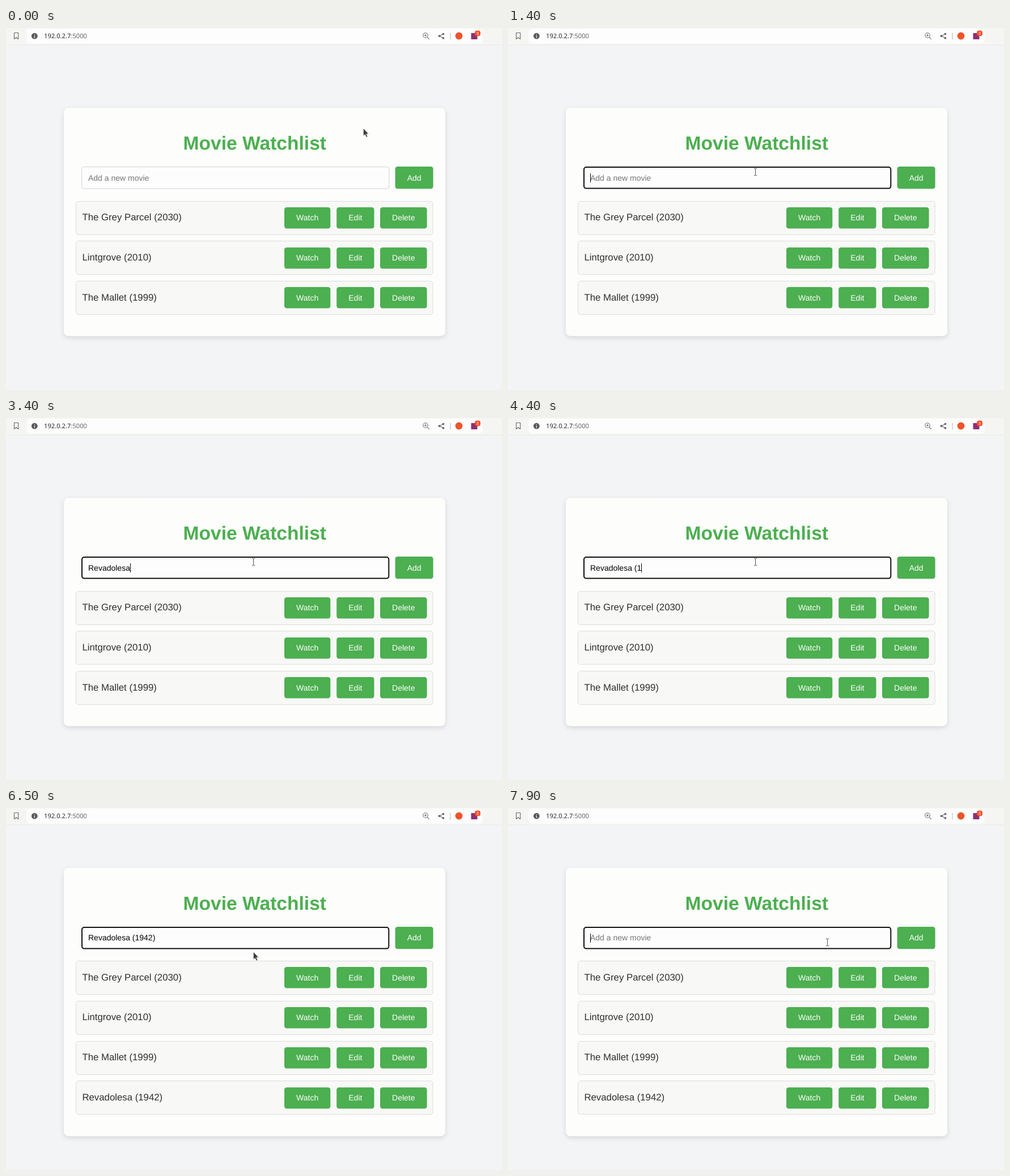
An HTML page for the animation above (8000 ms loop, 875 by 640 pixels).

```html
<!DOCTYPE html>
<html lang="en">
<head>
<meta charset="utf-8">
<title>Movie Watchlist</title>
<style>
  html, body { margin: 0; width: 100%; height: 100%; overflow: hidden; background: #f3f4f6; }
  svg { display: block; width: 875px; height: 640px; font-family: "Liberation Sans", Arial, sans-serif; }
  text { white-space: pre; text-rendering: geometricPrecision; }
  .icon { fill: none; stroke: #686868; stroke-width: 1.1; }
  .url { font: 11.2px "Noto Sans", "Open Sans", sans-serif; fill: #2b2b2b; }
  .title { font-size: 33.6px; font-weight: bold; fill: #4caf50; text-anchor: middle; }
  .name { font-size: 16.8px; fill: #2f2f2f; }
  .label { font-size: 14px; fill: #fff; text-anchor: middle; }
  .field { font-size: 14px; }
  .card { fill: #fdfdfc; filter: drop-shadow(0 3px 4px rgba(0, 0, 0, .12)); }
</style>
</head>
<body>
<svg viewBox="0 0 875 640">
  <rect width="875" height="640" fill="#f3f4f6"/>

  <g id="toolbar">
    <rect width="875" height="30" fill="#f5f6f3"/>
    <path d="M0 30H875" stroke="#e9eae4"/>
    <rect x="36.5" y="1" width="804" height="26.5" rx="6" fill="#fdfdfd"/>
    <path class="icon" d="M14.5 8.5h7.2v11l-3.6-2.8-3.6 2.8z" stroke-linejoin="round"/>
    <circle cx="50.3" cy="14.2" r="5.4" fill="#58595b"/>
    <path d="M50.3 11v1.3M50.3 13.4v4" stroke="#fff" stroke-width="1.2"/>
    <text class="url" x="67" y="18">192.0.2.7<tspan fill="#666">:5000</tspan></text>
    <g class="icon">
      <circle cx="740" cy="13" r="4.2"/>
      <path d="M743.1 16.2l3.6 3.6M738 13h4M740 11v4"/>
      <path d="M771.2 10.8l-6.4 3.3 6.4 3.3"/>
    </g>
    <g fill="#686868">
      <circle cx="771.4" cy="10.6" r="1.9"/>
      <circle cx="764.4" cy="14.2" r="1.9"/>
      <circle cx="771.4" cy="17.8" r="1.9"/>
    </g>
    <path d="M784 8.5v12" stroke="#b5b5b5"/>
    <circle cx="799" cy="14" r="6.4" fill="#f0532a"/>
    <rect x="820.5" y="9" width="11" height="11" fill="#8f2f72"/>
    <rect x="827" y="4.6" width="10" height="9.6" rx="4" fill="#f4512c"/>
    <text x="832" y="11.8" font-size="7" fill="#fff" text-anchor="middle">3</text>
  </g>

  <g id="page"></g>
  <rect id="input" rx="4" fill="#fdfdfd"/>
  <text id="field" class="field" x="145"></text>
  <path id="caret" d="M.5 0v16" stroke="#000"/>
  <g id="pointer">
    <path id="arrow" d="M0 0v13.2l2.9-2.5 2.3 4.8 2.2-1-2.3-4.7h4z" fill="#3a3b3d" stroke="#f4f4f4" stroke-width=".6"/>
    <path id="beam" d="M-2.7-6.2h2L0-5.5.7-6.2h2M-2.7 6.2h2L0 5.5.7 6.2h2M0-5.5v11" fill="none" stroke="#505050"/>
  </g>
</svg>
<script>
  const LOOP = 8000, STEP = 100, BLINK = 500;
  const ROW = 70.7, FIRST_ROW = 305.7;
  const FOCUS = 1100, SUBMIT = 6300, CLEAR = 7700;
  const ENTRY = "Revadolesa (1942)";
  const MOVIES = ["The Grey Parcel (2030)", "Lintgrove (2010)", "The Mallet (1999)", ENTRY];
  const KEY_TIMES = [1900, 2000, 2200, 2300, 2500, 2700, 2900, 3000, 3200, 3300,
                     3700, 4000, 4300, 4700, 5000, 5300, 5600];
  // time, x, y
  const POINTER = [[0, 630, 177], [100, 630, 177], [1000, 436, 254], [6900, 436, 254],
                   [7400, 507, 229], [7900, 563, 237]];

  const $ = id => document.getElementById(id);
  const set = (el, attrs) => { for (const k in attrs) el.setAttribute(k, attrs[k]); };
  const show = (el, on) => set(el, { visibility: on ? "visible" : "hidden" });
  const snap = Math.round;

  const button = (x, y, width, height, baseline, label) =>
    `<rect x="${x}" y="${snap(y)}" width="${width}" height="${height}" rx="4.2" fill="#4caf50"/>
     <text class="label" x="${x + width / 2}" y="${snap(baseline)}">${label}</text>`;

  function row(name, y) {
    const baseline = y + 34.43;
    const action = (x, width, label) => button(x, y + 11.1, width, 37.5, baseline, label);
    return `<rect x="123.5" y="${snap(y) + .5}" width="629.6" height="59" rx="4.2" fill="#f8f8f7" stroke="#dddde0"/>
      <text class="name" x="134.4" y="${snap(baseline)}">${name}</text>
      ${action(491, 81.3, "Watch")}${action(583.2, 66.3, "Edit")}${action(660, 82.6, "Delete")}`;
  }

  // The card is centred, so each extra row lifts its top by half a row.
  function page(count, lift) {
    const rows = MOVIES.slice(0, count).map((name, i) => row(name, FIRST_ROW + i * ROW - lift));
    return `<rect class="card" x="102" y="${141.2 - lift}" width="673" height="${403.6 + 2 * lift}" rx="8.4"/>
      <text class="title" x="438.8" y="${snap(215.3 - lift)}">Movie Watchlist</text>
      ${button(686.6, 245.4 - lift, 67, 39.2, 269.6 - lift, "Add")}${rows.join("")}`;
  }

  function pointerAt(t) {
    const i = POINTER.findIndex(p => p[0] > t);
    if (i < 0) return POINTER[POINTER.length - 1].slice(1);
    const [t0, x0, y0] = POINTER[i - 1], [t1, x1, y1] = POINTER[i];
    const u = (t - t0) / (t1 - t0), e = u * u * (3 - 2 * u);
    return [x0 + (x1 - x0) * e, y0 + (y1 - y0) * e];
  }

  let shownCount = 0;
  function render(t) {
    const focused = t >= FOCUS;
    const count = t >= SUBMIT ? 4 : 3;
    const lift = (count - 3) * ROW / 2;
    if (count !== shownCount) $("page").innerHTML = page(shownCount = count, lift);

    const inputTop = snap(245.3 - lift);
    const inset = focused ? 1 : .5;
    set($("input"), {
      x: 133 + inset, y: inputTop + inset, width: 543.3 - 2 * inset, height: 39.6 - 2 * inset,
      stroke: focused ? "#101010" : "#d2d2d2", "stroke-width": 2 * inset
    });

    const keys = KEY_TIMES.filter(k => k <= t);
    const typed = t < CLEAR ? ENTRY.slice(0, keys.length) : "";
    const field = $("field");
    field.textContent = typed || "Add a new movie";
    set(field, { y: snap(269.6 - lift), fill: typed ? "#000" : "#757575" });

    const lastEdit = t >= CLEAR ? CLEAR : keys.length ? keys[keys.length - 1] : FOCUS;
    const caretX = 145 + (typed ? snap(field.getComputedTextLength()) : 0);
    set($("caret"), { transform: `translate(${caretX} ${inputTop + 12})` });
    show($("caret"), focused && Math.floor((t - lastEdit) / BLINK) % 2 === 0);

    const [x, y] = pointerAt(t);
    const inField = x > 133 && x < 677 && y > inputTop && y < inputTop + 40;
    set($("pointer"), { transform: `translate(${snap(x) + .5} ${snap(y) + .5})` });
    show($("beam"), inField);
    show($("arrow"), !inField);
  }

  const start = performance.now();
  function tick() {
    const t = (performance.now() - start) % LOOP;
    render(Math.floor(t / STEP) * STEP);
    requestAnimationFrame(tick);
  }
  tick();
</script>
</body>
</html>
```
